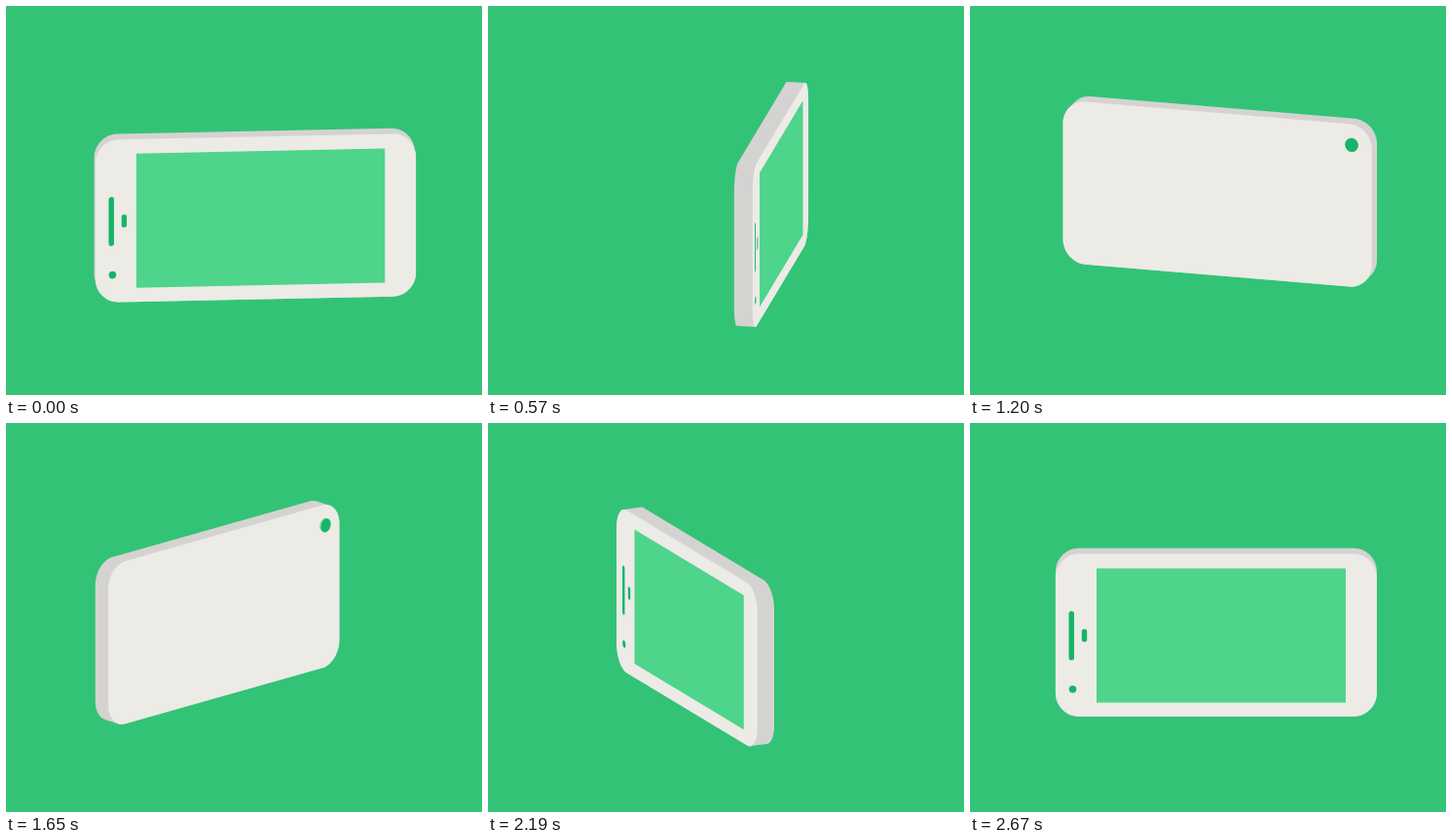
Recreate the animation shown at these times as an HTML page with a canvas. Size 489 px wide and 400 px high, loop 2.7 s.

```html
<!DOCTYPE html>
<html lang="en">
<head>
<meta charset="utf-8">
<title>Rotating phone</title>
<style>
  html, body { margin: 0; width: 100%; height: 100%; overflow: hidden; background: #33c377; }
  canvas { display: block; }
</style>
</head>
<body>
<canvas id="stage" width="489" height="400"></canvas>
<script>
const ctx = document.getElementById('stage').getContext('2d');
const LOOP = 2700, STEP = 30;
const CENTER = { x: 249, y: 203.3 };
const TILT = 0.294;            // vertical shift per unit of depth
const FRONT = 51.5, BACK = 32.3;
const BODY = { left: -161.1, right: 168.9, top: -84, bottom: 83.3, radius: 24 };
const COLOR = {
  background: '#33c377', side: '#d5d3d1', face: '#ecebe6',
  screen: '#4ed48b', detail: '#17b567', lensSide: '#8ecaa8'
};

// Clockwise outline of the rounded body, in the plane of the phone.
function bodyOutline() {
  const { left, right, top, bottom, radius: r } = BODY;
  const corners = [[right - r, bottom - r], [left + r, bottom - r], [left + r, top + r], [right - r, top + r]];
  return corners.flatMap(([x, y], corner) =>
    Array.from({ length: 13 }, (_, i) => {
      const a = (corner + i / 12) * Math.PI / 2;
      return [x + r * Math.cos(a), y + r * Math.sin(a)];
    }));
}
const outline = bodyOutline();

// Origin on stage of the plane lying at depth z.
const planeOrigin = (z, cos, sin) => [CENTER.x + z * sin, CENTER.y + TILT * z * cos];

function setPlane(z, cos, sin) {
  ctx.setTransform(cos, -TILT * sin, 0, 1, ...planeOrigin(z, cos, sin));
}

function fillShape(color, build) {
  ctx.fillStyle = color;
  ctx.beginPath();
  build();
  ctx.fill();
}

const box = (color, x, y, w, h, r = 0) => fillShape(color, () => ctx.roundRect(x, y, w, h, r));
const disc = (color, x, y, r) => fillShape(color, () => ctx.arc(x, y, r, 0, 2 * Math.PI));

function tracePoints(points) {
  points.forEach(([x, y]) => ctx.lineTo(x, y));
  ctx.closePath();
}

// Silhouette of the extruded body: each edge lies on whichever plane is outermost.
function drawSilhouette(cos, sin) {
  const front = planeOrigin(FRONT, cos, sin), back = planeOrigin(BACK, cos, sin);
  const ox = front[0] - back[0], oy = front[1] - back[1];
  const project = ([x, y]) => [x * cos, y - TILT * x * sin];
  const points = outline.flatMap((point, i) => {
    const [ax, ay] = project(point);
    const [bx, by] = project(outline[(i + 1) % outline.length]);
    const facing = ((by - ay) * ox - (bx - ax) * oy) * cos;
    const [px, py] = facing > 0 ? front : back;
    return [[ax + px, ay + py], [bx + px, by + py]];
  });
  fillShape(COLOR.side, () => tracePoints(points));
}

function drawFront(cos, sin) {
  setPlane(FRONT, cos, sin);
  fillShape(COLOR.face, () => tracePoints(outline));
  box(COLOR.screen, -119, -69, 256, 138);
  box(COLOR.detail, -147.5, -25, 5.5, 50.5, 2.5);
  box(COLOR.detail, -134.2, -6.5, 5.4, 13, 2);
  disc(COLOR.detail, -143.5, 55.3, 3.8);
}

function drawBack(cos, sin) {
  setPlane(BACK, cos, sin);
  fillShape(COLOR.face, () => tracePoints(outline));
  disc(COLOR.lensSide, -140, -63, 7);
  setPlane(BACK - 2, cos, sin);
  disc(COLOR.detail, -140, -63, 7);
}

function draw(now) {
  const step = Math.floor((now % LOOP) / STEP);
  const angle = (step + 1) * STEP / LOOP * 2 * Math.PI;
  const cos = Math.cos(angle), sin = Math.sin(angle);

  ctx.resetTransform();
  ctx.fillStyle = COLOR.background;
  ctx.fillRect(0, 0, 489, 400);
  drawSilhouette(cos, sin);
  (cos > 0 ? drawFront : drawBack)(cos, sin);
}

const start = performance.now();
function tick() {
  draw(performance.now() - start);
  requestAnimationFrame(tick);
}
tick();
</script>
</body>
</html>
```
